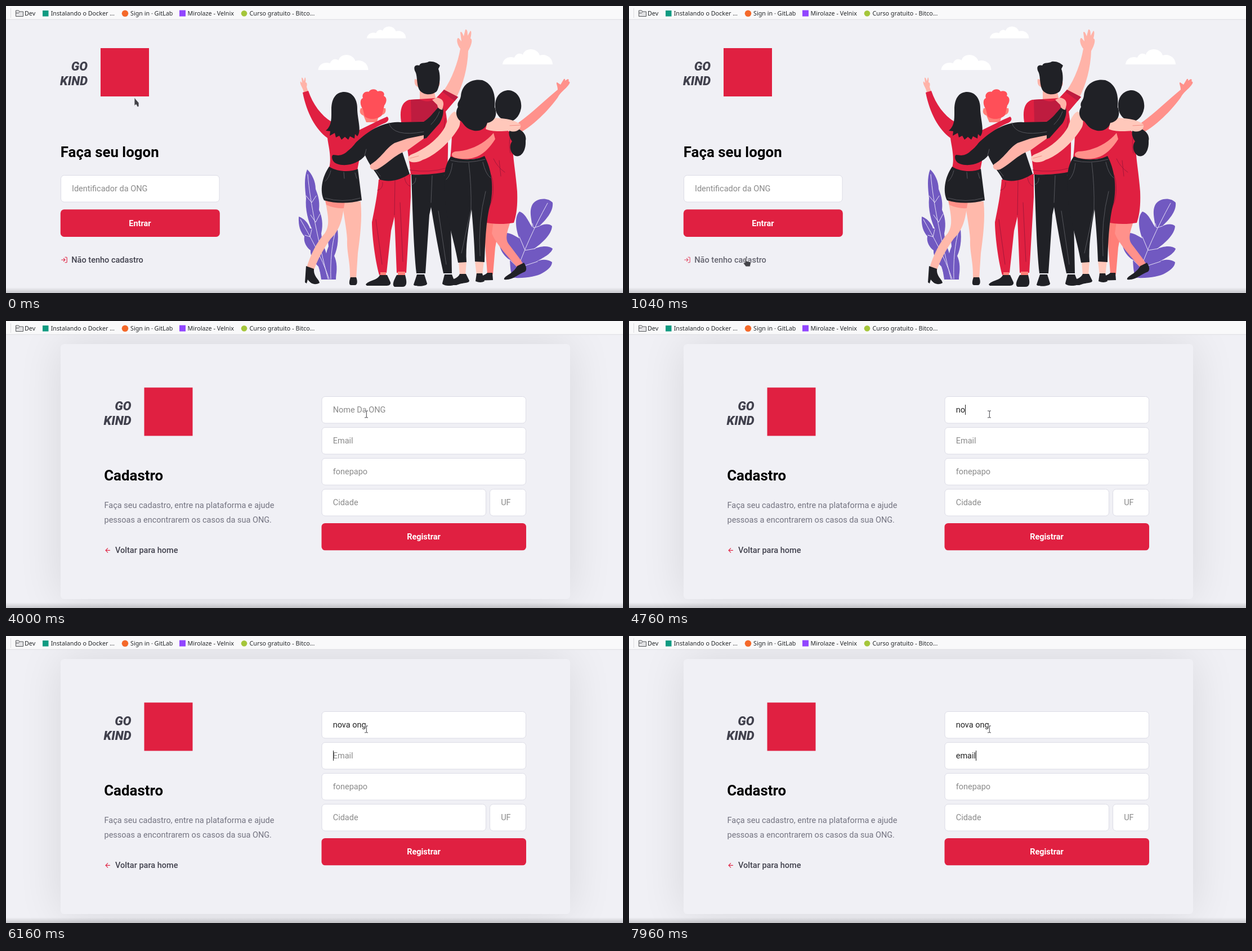
An HTML page for the animation above (8 s loop, 1096 by 511 pixels).

```html
<!DOCTYPE html>
<html lang="pt-BR">
<head>
<meta charset="utf-8">
<title>Cadastro de ONG</title>
<style>
html, body { margin: 0; width: 100%; height: 100%; overflow: hidden; background: #f0f0f5; }
svg { display: block; width: 100%; height: 100%; }
text { font: 14.5px Roboto, sans-serif; white-space: pre; }
.bar text { font: 10.75px "Noto Sans", sans-serif; fill: #232629; }
.h1 { font-size: 25.85px; font-weight: 700; }
.p { fill: #737380; }
.link { font-weight: 500; fill: #41414d; }
.btn { font-weight: 700; fill: #fff; text-anchor: middle; }
.hint { fill: #8a8a8a; }
.typed { fill: #222; }
.logo { font-size: 22px; font-weight: 800; font-style: italic; fill: #41414d; text-anchor: end; }
.box { fill: #fff; stroke: #dcdce6; }
.icon { fill: none; stroke: #e02041; stroke-width: 2; stroke-linecap: round; stroke-linejoin: round; }
.k { fill: #202126; } .r { fill: #e02041; } .d { fill: #be1c3f; } .v { fill: #7159c1; }
.s1 { fill: #ffb9ab; } .s2 { fill: #ff7f78; } .s3 { fill: #ffb3a8; } .s4 { fill: #ffc8bb; } .s5 { fill: #ff918b; }
.line { fill: none; stroke-linecap: round; stroke-width: 1; }
.seam { stroke: #55565c; } .fold { stroke: #a5173a; } .vein { stroke: #e5dff5; }
.cur { fill: #434348; stroke: #e9e9ee; stroke-width: .9; stroke-linejoin: round; }
</style>
</head>
<body>
<svg viewBox="0 0 1096 511" preserveAspectRatio="none">
<defs>
  <filter id="blur" x="-20%" y="-40%" width="140%" height="180%"><feGaussianBlur stdDeviation="40"/></filter>
  <linearGradient id="fade" x2="0" y2="1"><stop stop-color="#000" stop-opacity="0"/><stop offset="1" stop-color="#000" stop-opacity=".17"/></linearGradient>
  <path id="cloud" fill="#fff" d="M0 0C1-11 12-15 21-12C25-21 33-20 36-17C39-30 61-31 66-16C76-20 89-13 89 0Z"/>
  <g id="brand">
    <text class="logo" x="48" y="40">GO</text>
    <text class="logo" x="48" y="66">KIND</text>
    <rect class="r" x="71" width="86" height="86"/>
  </g>
</defs>
<rect width="1096" height="511" fill="#f0f0f5"/>

<g id="login">
  <use href="#brand" x="97" y="75"/>
  <text class="h1" x="96.800" y="269">Faça seu logon</text>
  <rect class="box" x="97.500" y="301.500" width="281.500" height="47.500" rx="6"/>
  <text class="hint" x="117" y="330">Identificador da ONG</text>
  <rect class="r" x="96.800" y="362.300" width="283" height="48.600" rx="6.400"/>
  <text class="btn" x="238" y="391.500">Entrar</text>
  <g id="link">
    <path class="icon" transform="translate(97 445.600) scale(.533)" d="M15 3h4a2 2 0 0 1 2 2v14a2 2 0 0 1-2 2h-4M10 17l5-5-5-5M15 12H3"/>
    <text class="link" x="116.300" y="457">Não tenho cadastro</text>
  </g>

  <use href="#cloud" transform="translate(641 57.500) scale(.78)"/>
  <use href="#cloud" x="554.500" y="114"/>
  <use href="#cloud" x="882" y="104"/>

  <!-- foliage -->
  <g class="v">
    <path d="M535 291C529 305 531 326 533 342C531 362 537 384 544 398C549 425 555 455 560 487H583C570 450 562 425 560 405C564 388 561 374 556 363C558 345 553 334 550 326C550 312 543 298 535 291Z"/>
    <path d="M520 375C519 392 523 402 530 410C528 420 534 430 541 435C540 446 549 458 555 464L562 487H586C588 470 580 452 570 445C567 430 561 420 555 416C553 404 546 396 540 396C537 386 529 378 520 375Z"/>
    <path d="M587 385C577 395 570 410 573 428C565 445 566 470 570 487H585C589 470 588 455 583 445C590 430 592 410 587 385Z"/>
    <path d="M971 350C962 340 943 342 936 352C928 364 934 380 935 394C929 386 923 369 912 366C903 374 905 397 912 414C902 407 889 401 879 405C872 417 876 440 895 452C896 467 896 477 902 484C925 485 943 481 952 476C964 469 970 463 970 456C961 450 950 451 942 455C953 449 969 441 971 432C963 425 947 428 937 433C951 423 969 408 970 392C964 386 952 389 946 393C958 382 973 366 971 350Z"/>
  </g>
  <path class="line vein" d="M536 300C540 350 555 420 572 486M533 338L543 350L551 338M541 372L550 385L558 370M523 380C540 410 560 445 574 486M531 408L540 411L543 398M587 395C578 425 576 455 577 486M962 351C938 395 917 440 904 483M935 387L937 395L947 392M912 411L922 435L940 432M895 452L910 466L944 455M881 410L912 454"/>

  <!-- woman in dress -->
  <path class="s2" d="M851 383H878L869 430L865 478H855C853 445 849 415 851 383Z"/>
  <path class="s5" d="M866 383L896 384C890 403 886 414 893 424C905 440 915 452 920 462L910 468C894 448 872 427 863 405Z"/>
  <path class="k" d="M908 463L920 457C924 463 926 469 922 473C910 477 900 489 885 487C883 481 901 477 908 463ZM835 489C840 481 850 480 855 475H864L865 488Z"/>
  <path class="r" d="M862 222C880 212 899 222 901 235C898 262 905 290 908 330C909 355 907 372 902 386C885 389 862 389 845 384C852 350 848 300 850 260Z"/>
  <path class="line fold" d="M866 272Q873 287 886 296M876 275L879 303M862 301Q874 340 847 380M895 235Q893 250 896 262"/>
  <path class="s5" d="M910 208C935 190 960 165 980 149C980 142 976 136 979 136L985 140L991 130Q994 129 993 133L998 130Q1001 131 999 134Q1004 135 999 141C993 149 985 153 980 163C965 184 935 216 906 229Z"/>
  <path class="k" d="M869 180C868 160 880 150 893 150C908 151 917 166 915 182C912 198 902 206 892 206C880 204 870 194 869 180ZM900 217C914 217 926 228 923 240C924 258 915 270 905 267C895 262 893 248 899 241C891 230 892 220 900 217Z"/>

  <!-- woman with left raised arm -->
  <path class="s3" d="M529 155C529 147 521 140 523 134L526 137L525 128Q527 126 529 134L531 127Q533 128 532 136Q536 136 534 144L537 153Z"/>
  <path class="s1" d="M567 346H601C599 380 592 400 577 414C562 435 552 455 547 470L534 466C540 445 552 420 566 405C577 390 571 368 567 346Z"/>
  <path class="s1" d="M597 348H630C633 380 629 410 625 440L622 486H611C612 455 605 440 606 415C605 395 600 375 597 348Z"/>
  <path class="s2" opacity=".7" d="M567 346L602 348L600 360Q584 361 569 354Z"/>
  <path class="k" d="M533 463L547 468C546 482 556 486 557 493C548 498 541 494 536 487L534 494L531 492ZM612 483H622C625 490 624 497 620 497H613C609 497 609 491 612 483Z"/>
  <path class="r" d="M527 154L537 151C545 175 560 195 578 206L618 215L632 250L624 292C610 297 590 296 574 288C579 270 572 246 571 235C550 220 534 190 527 154Z"/>
  <path class="k" d="M574 286C590 296 612 296 625 290L632 346C610 352 585 352 565 346C557 330 561 305 574 286Z"/>
  <path class="line seam" d="M577 293Q574 306 567 312M600 296L601 307M620 297L623 307M567 342Q598 351 629 342"/>

  <!-- man in red shirt -->
  <path class="s3" d="M778 150C792 130 803 100 807 76C800 67 800 56 804 57L809 63L807 47Q809 43 813 54L816 42Q820 40 820 53L825 44Q828 45 825 58C829 58 828 68 821 80C820 110 812 140 800 163Z"/>
  <path class="s3" d="M735 148H760L764 168Q748 177 735 168ZM726 130Q724 142 733 145L736 132ZM764 135Q773 132 770 142L764 145Z"/>
  <path class="r" d="M716 167L764 164L778 149L803 162L781 188C787 220 785 265 784 296C765 300 735 301 719 300C716 275 712 240 705 220C698 195 699 172 716 167Z"/>
  <path class="d" d="M719 167L735 166Q749 174 763 165L769 186L744 205L720 206ZM778 149L803 162L797 169L775 153Z"/>
  <path class="line fold" d="M717 292Q752 298 784 288M718 208L716 240M780 200L777 225"/>
  <path class="k" d="M728 119C722 108 727 104 734 106C737 99 745 103 751 99C758 98 766 101 771 106L768 112C773 125 770 145 765 152C756 160 741 159 734 149C729 138 731 128 728 119Z"/>
  <path class="k" d="M720 300C745 301 765 299 784 295L790 380L792 476H777C769 440 762 400 755 358L752 372L745 476H729C724 430 722 360 720 300Z"/>
  <path class="line seam" d="M757 302L755 350M728 306Q728 316 721 318M779 301Q780 312 787 316M768 365L782 460"/>
  <path class="k" d="M730 478H743L748 494C749 500 724 500 724 496ZM779 478H792L798 493C799 500 776 499 775 494Z"/>

  <!-- man in black sweater -->
  <path class="s2" d="M630 182Q626 192 635 195L640 207H659L662 195Q677 194 674 182Z"/>
  <path fill="#ff4f58" d="M634 184C627 173 630 165 634 164C631 156 639 151 644 153C649 146 658 148 660 152C668 149 674 155 671 160C678 163 676 172 672 177L668 194C661 203 643 203 637 196Z"/>
  <path class="r" d="M662 309L719 299L719 340L711 475H694L690 375L684 400L676 475L663 479C655 450 650 405 650 385C655 360 660 335 662 309Z"/>
  <path class="line fold" d="M691 310L690 372M669 314Q670 326 660 328M708 306Q710 318 718 321M657 380L668 460M700 350L705 455"/>
  <path class="s2" d="M665 474H675V482H665ZM696 473H709V483H696Z"/>
  <path class="k" d="M639 496C644 488 660 489 664 479H677L683 492C684 497 679 498 675 498H641ZM694 479H709C713 493 712 500 704 500H690C685 497 689 488 694 479Z"/>
  <path class="k" d="M626 236C648 220 674 205 700 207L742 206C755 198 760 187 773 176C780 184 776 200 770 209L747 235C730 240 712 240 699 245L717 299C702 309 682 315 664 309C655 292 646 285 638 266C627 280 605 287 588 281C579 278 577 267 581 265C598 267 614 257 626 236Z"/>
  <path class="line seam" d="M680 208Q687 234 742 224M770 188Q766 200 755 211M640 255L637 266M655 290L665 303"/>
  <path class="r" d="M574 240C595 241 642 212 677 197C681 200 680 205 674 208C650 217 622 240 605 260C594 269 583 266 580 262Z"/>
  <path class="s3" d="M765 163Q778 165 777 176L775 185Q767 184 766 176L757 167Z"/>
  <path class="s3" d="M713 236L690 244C676 252 667 270 648 282C644 288 650 294 659 291C680 280 688 266 713 257L742 236V230Z"/>
  <path class="k" d="M578 185C578 162 588 153 601 153C616 153 625 167 624 185C625 205 632 223 624 232L620 228L619 236L611 232L608 238L602 233L596 238L592 231L586 234L584 226L575 231L576 223L568 222C579 213 578 200 578 185Z"/>

  <!-- woman in front -->
  <path class="s4" d="M804 454H818L816 480H806ZM833 454H849L846 480H836Z"/>
  <path class="k" d="M806 477H817L823 489C823 494 812 492 800 497H781C776 496 777 490 781 489C796 487 803 484 806 477ZM836 476H846L850 490Q843 494 834 490Z"/>
  <path class="r" d="M797 194L862 205C864 235 858 262 850 269C830 275 805 274 789 270C793 240 791 215 797 194Z"/>
  <path class="k" d="M790 268C810 276 838 274 850 267C862 290 867 320 861 350C852 380 851 430 850 456L833 455C832 420 829 385 827 362C821 395 816 430 818 456L803 457C795 410 779 370 779 330C777 300 780 282 790 268Z"/>
  <path class="line seam" d="M790 275Q819 282 851 273M822 279Q827 320 826 362M793 280Q791 300 782 309M847 278Q852 300 861 306M826 362L809 440M852 330Q838 385 842 445"/>
  <path class="s5" d="M866 226C850 245 825 258 798 259C789 261 790 270 801 271C830 276 850 267 869 237Z"/>
  <path class="s4" d="M797 188C807 194 809 207 804 217C787 245 762 266 740 274C729 281 715 279 714 272C713 266 722 264 732 259C753 248 771 232 780 215C785 200 790 190 797 188Z"/>
  <path class="s4" d="M857 199C880 199 902 201 914 211C916 219 906 227 894 222C875 224 860 223 852 219Z"/>
  <path class="line" stroke="#f58f86" d="M895 213L914 212M718 271L733 267"/>
  <path class="k" d="M808 160C810 138 828 129 846 132C866 139 870 160 868 180C875 197 865 207 855 208C852 220 838 225 828 221C812 216 812 205 806 204C797 195 800 184 803 180C800 171 807 169 808 160Z"/>
</g>

<g id="form">
  <svg y="24" width="1096" height="487" viewBox="0 24 1096 487"><rect x="97" y="41" width="905" height="454" opacity=".1" filter="url(#blur)"/></svg>
  <rect x="97" y="41" width="905" height="454" rx="6.400" fill="#f0f0f5"/>
  <use href="#brand" x="174.500" y="118.500"/>
  <text class="h1" x="174.200" y="283.500">Cadastro</text>
  <text class="p" x="174.500" y="333.300">Faça seu cadastro, entre na plataforma e ajude</text>
  <text class="p" x="174.500" y="359">pessoas a encontrarem os casos da sua ONG.</text>
  <path class="icon" transform="translate(174.300 402) scale(.533)" d="M19 12H5M12 19l-7-7 7-7"/>
  <text class="link" x="194" y="413.300">Voltar para home</text>
  <g id="boxes"></g>
  <rect class="r" x="560.500" y="360" width="363.500" height="48.300" rx="6.400"/>
  <text class="btn" x="742" y="389.300">Registrar</text>
  <rect id="caret" width="1" height="18" fill="#222"/>
  <path fill="none" stroke="#fff" stroke-width="2.500" d="M637 160h6M637 172h6M640 160v12"/>
  <path fill="none" stroke="#434348" d="M637 160h2.500l.5.5l.5-.5h2.500M637 172h2.500l.5-.5l.5.5h2.500M640.300 160v12"/>
</g>

<path id="arrow" class="cur" d="M0 0V14.500L3.200 12.300L5.500 16.800L8 16V9.500Z"/>
<path id="hand" class="cur" d="M3 0Q4.500-1 5.500 0.500V5L12 6.300Q14 7 13.500 9L12 15H4.500L0 9Q0 7 3 8Z"/>

<g class="bar">
  <rect width="1096" height="24" fill="#f9f9fa"/>
  <path stroke="#dcdce0" d="M0 24h1096M8.500 4v17"/>
  <path fill="#e2e2e4" stroke="#56585b" d="M17.500 18.500V8h5l1.500 2h6.500v8.500zM17.500 12.500h5l1.500-2"/>
  <rect x="65" y="8" width="10.500" height="10.500" fill="#0f9b82"/>
  <circle cx="211.500" cy="13.300" r="5.800" fill="#f4692a"/>
  <rect x="308" y="7.500" width="11" height="11" fill="#9146ff"/>
  <circle cx="423" cy="13.300" r="5.300" fill="#a5c63b"/>
  <text x="33" y="17">Dev</text>
  <text x="79.700" y="17">Instalando o Docker ...</text>
  <text x="221" y="17">Sign in · GitLab</text>
  <text x="322.500" y="17">Mirolaze - Velnix</text>
  <text x="432.500" y="17">Curso gratuito - Bitco...</text>
</g>
<rect y="501" width="1096" height="10" fill="url(#fade)"/>
</svg>
<script>
const $ = id => document.getElementById(id);
const LOOP = 8000, SWITCH = 2920;
const clamp = v => Math.min(1, Math.max(0, v));

// Label, left, top, width
const fields = [
  ['Nome Da ONG', 561, 134, 363],
  ['Email', 561, 189, 363],
  ['fonepapo', 561, 244, 363],
  ['Cidade', 561, 299, 292],
  ['UF', 859.5, 299, 64.5]
];
$('boxes').innerHTML = fields.map(([label, x, y, w]) =>
  `<rect class="box" x="${x}" y="${y + .5}" width="${w - .5}" height="47.5" rx="6"/>
   <text class="hint" x="${x + 19.7}" y="${y + 29}">${label}</text>`).join('');
const labels = $('boxes').querySelectorAll('text');

// Start time, value
const typing = [
  [[4760, 'no'], [4920, 'nov'], [5080, 'no'], [5280, 'nova '], [5480, 'nova o'], [5680, 'nova on'], [5840, 'nova ong']],
  [[7320, 'e'], [7440, 'em'], [7560, 'ema'], [7680, 'emai'], [7960, 'email']]
];
const valueAt = (keys, t) => keys.reduce((v, [at, s]) => t >= at ? s : v, '');
const show = (el, on) => el.setAttribute('visibility', on ? 'visible' : 'hidden');

function setField(i, t) {
  const value = valueAt(typing[i], t), el = labels[i];
  const text = value || fields[i][0];
  if (el.textContent !== text) el.textContent = text;
  el.setAttribute('class', value ? 'typed' : 'hint');
  return value ? el.getComputedTextLength() : 0;
}

function drawPointer(t) {
  const steps = (from, n) => clamp(Math.floor((t - from) / 40 + 1) / n);
  const ease = k => k * k * (3 - 2 * k);
  const a = ease(steps(400, 4)), b = ease(steps(720, 5));
  const x = 228 + 90.5 * a - 115.5 * b, y = 163 + 275 * a + 11 * b;
  const hover = t >= 840;
  const pos = `translate(${x} ${y})`;
  $('arrow').setAttribute('transform', pos);
  $('hand').setAttribute('transform', pos);
  show($('arrow'), t < SWITCH && !hover);
  show($('hand'), t < SWITCH && hover);
  $('link').setAttribute('opacity', 1 - .2 * clamp((t - 840) / 200));
}

function render(t) {
  const form = t >= SWITCH;
  $('login').style.display = form ? 'none' : '';
  $('form').style.display = form ? '' : 'none';
  drawPointer(t);
  if (!form) return;
  const widths = [setField(0, t), setField(1, t)];
  const active = t < 6160 ? 0 : 1;
  $('caret').setAttribute('x', Math.floor(581 + widths[active]));
  $('caret').setAttribute('y', active ? 204 : 149);
  const blinkOff = (t >= 4000 && t < 4760) || (t >= 5280 && t < 5480);
  show($('caret'), !blinkOff);
}

const start = performance.now();
function tick() {
  render((performance.now() - start) % LOOP);
  requestAnimationFrame(tick);
}
tick();
</script>
</body>
</html>
```
